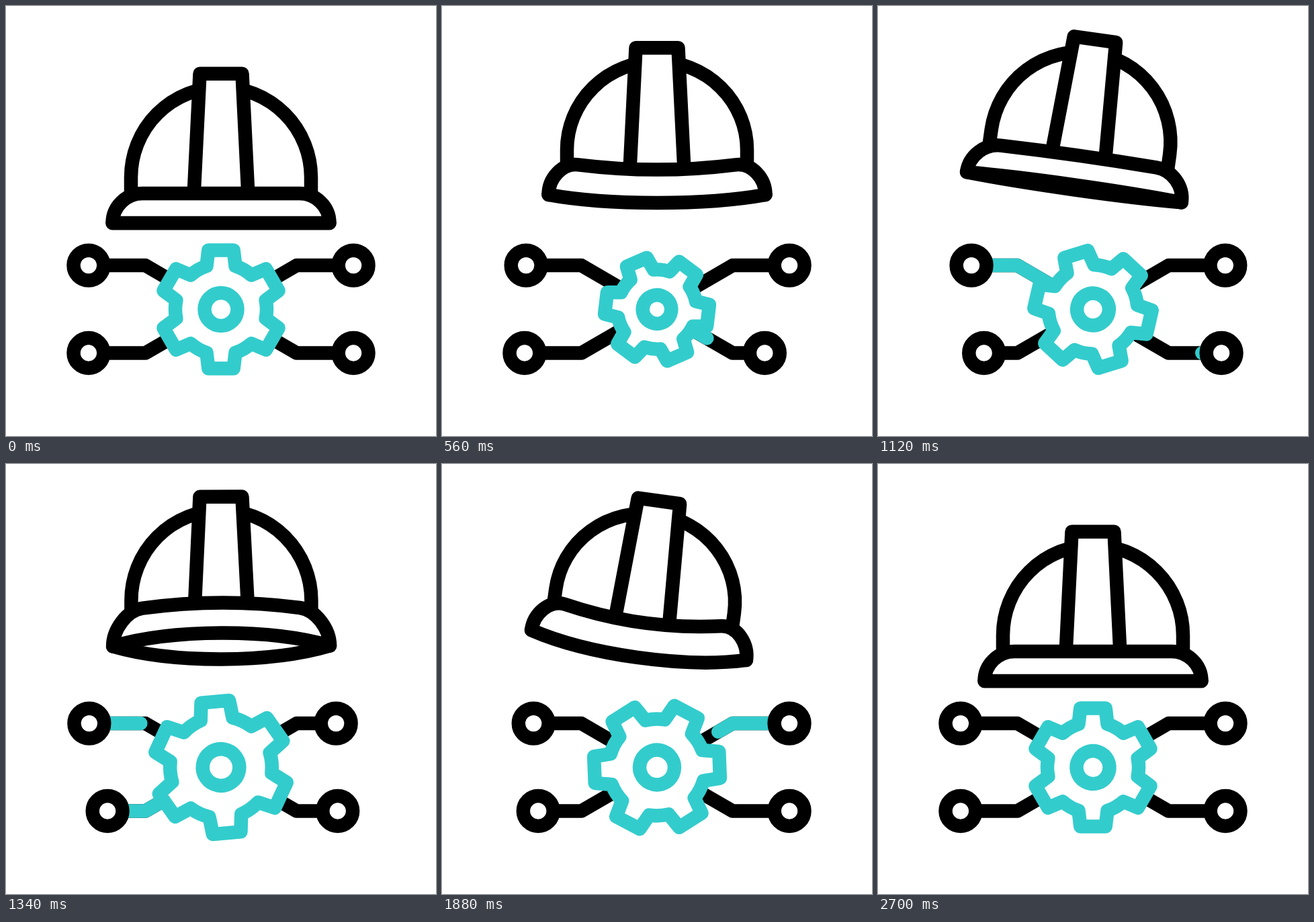
An HTML page with a canvas that plays this animation: 640x640 px, repeating every 3 s.

```html
<!DOCTYPE html>
<html lang="en">
<head>
<meta charset="utf-8">
<title>Engineering helmet</title>
<style>
  html, body { margin: 0; width: 100%; height: 100%; overflow: hidden; background: #fff; }
  canvas { display: block; width: 640px; height: 640px; }
</style>
</head>
<body>
<canvas id="stage" width="640" height="640"></canvas>
<script>
const ctx = document.getElementById('stage').getContext('2d');
const LOOP = 3000, STEP = 20, START = 200, STAGGER = 300;
const BLACK = '#000', TEAL = '#33cccc', WHITE = '#fff';
const WEIGHT = 20.5;
const CX = 320, CY = 451.5;
const DEG = Math.PI / 180;

// Sine ease from 0 to 1 between two times.
function ease(t, from, to) {
  const p = Math.min(1, Math.max(0, (t - from) / (to - from)));
  return (1 - Math.cos(Math.PI * p)) / 2;
}

// Rise to 1, hold, fall back to 0.
const pulse = (t, a, b, c, d) => ease(t, a, b) - ease(t, c, d);

const landing = t => ease(t, 2060, 2710);

const lift = t => -46 * (ease(t, START, 690) - landing(t)) - 6 * pulse(t, 860, 1200, 1500, 1880);

const tilt = t => 8.2 * (pulse(t, 560, 1100, 1100, 1320)
  - pulse(t, 1320, 1540, 1540, 1720) + pulse(t, 1720, 1900, 1900, 2280));

const bend = t => 18.5 * (ease(t, START, 800) - landing(t)) - 38 * pulse(t, 850, 1340, 1340, 1800);

const gearScale = t => 1 - 0.19 * pulse(t, START, 780, 780, 1460) + 0.14 * pulse(t, 780, 1460, 1460, 2220);

const gearTurn = t => -55 * ease(t, START, 1000) - 145 * ease(t, 880, 1820) - 40 * ease(t, 1390, 2700);

const nodeShift = t => 37 * pulse(t, 0, 380, 420, 790) + 24 * pulse(t, 790, 1180, 1180, 1610);

// Corners in the order in which they start moving.
const NODES = [[1, 1], [-1, -1], [-1, 1], [1, -1]];

function paint(stroke, fill) {
  if (fill) { ctx.fillStyle = fill; ctx.fill(); }
  ctx.strokeStyle = stroke;
  ctx.stroke();
}

function ring(x, y, r, color) {
  ctx.beginPath();
  ctx.arc(x, y, r, 0, Math.PI * 2);
  paint(color, WHITE);
}

function polyline(...points) {
  ctx.beginPath();
  points.forEach(p => ctx.lineTo(...p));
}

function drawNode([sx, sy], phase) {
  const bendX = CX + sx * 112.5, y = CY - 0.2 + sy * 65.2;
  const x = CX + sx * (197.1 - nodeShift(phase));
  polyline([CX, CY], [bendX, y], [x, y]);
  paint(BLACK);

  // signal travelling from the gear to the node
  const total = Math.hypot(112.5, 65.2) + Math.abs(x - bendX);
  const reach = 0.53 * (phase - 198);
  const head = Math.min(total, reach), tail = Math.max(0, reach - 203);
  if (head > tail) {
    ctx.setLineDash([0, tail, head - tail, 1000]);
    paint(TEAL);
    ctx.setLineDash([]);
  }
  ring(x, y, 22.4, BLACK);
}

function drawGear(t) {
  const s = gearScale(t);
  const base = Math.atan2(21.5, 64.5), valley = 68 * s;
  const tip = Math.atan2(18.7, 88), tipRadius = Math.hypot(18.7, 88) * s;
  ctx.save();
  ctx.translate(CX, CY);
  ctx.rotate(gearTurn(t) * DEG);
  ctx.beginPath();
  for (let i = 0; i < 6; i++) {
    const a = i * 60 * DEG - Math.PI / 2;
    for (const corner of [a - tip, a + tip]) {
      ctx.lineTo(tipRadius * Math.cos(corner), tipRadius * Math.sin(corner));
    }
    ctx.arc(0, 0, valley, a + base, a + 60 * DEG - base);
  }
  ctx.closePath();
  paint(TEAL, WHITE);
  ring(0, 0, 24.5 * s, TEAL);
  ctx.restore();
}

function drawHelmet(t) {
  const half = 161.5, inner = 117;
  const b = bend(t), down = Math.max(b, 0), up = Math.max(-b, 0);
  const rim = 201 - 0.3 * down;
  const shoulder = rim - 44 - 0.05 * down - 0.65 * up;
  const middle = rim - 44 + 0.55 * down - 1.05 * up;
  const control = 2 * middle - shoulder;
  const outer = inner + 24, knee = shoulder - (control - shoulder) / inner * 24;
  const rimCurve = (from, sag) => {
    const y = rim + sag * 4 / 3;
    ctx.bezierCurveTo(from * 0.45, y, -from * 0.45, y, -from, rim);
  };

  ctx.save();
  ctx.translate(CX, 122 + lift(t));
  ctx.rotate(tilt(t) * DEG);

  // far side of the rim
  ctx.beginPath();
  ctx.moveTo(-half, rim);
  rimCurve(-half, -b);
  paint(BLACK, WHITE);

  // dome
  const squeeze = 0.2 * down;
  ctx.beginPath();
  ctx.moveTo(-134, 157);
  ctx.ellipse(0, 133 - squeeze, 134, 134 - squeeze, 0, Math.PI, 0);
  ctx.lineTo(134, 157);
  paint(BLACK, WHITE);

  // ridge
  polyline([-40.3, 157], [-31.5, -21.3], [31.5, -21.3], [40.3, 157]);
  paint(BLACK, WHITE);

  // brim
  ctx.beginPath();
  ctx.moveTo(-half, rim);
  ctx.bezierCurveTo(-half, rim - 24.5, -outer, knee, -inner, shoulder);
  ctx.quadraticCurveTo(0, control, inner, shoulder);
  ctx.bezierCurveTo(outer, knee, half, rim - 24.5, half, rim);
  rimCurve(half, b);
  ctx.closePath();
  paint(BLACK, WHITE);
  ctx.restore();
}

function frame(now) {
  const t = Math.floor((now % LOOP) / STEP) * STEP;
  ctx.fillStyle = WHITE;
  ctx.fillRect(0, 0, 640, 640);
  ctx.lineWidth = WEIGHT;
  ctx.lineCap = ctx.lineJoin = 'round';
  NODES.forEach((corner, i) => drawNode(corner, t - START - i * STAGGER));
  drawGear(t);
  drawHelmet(t);
}

const begin = performance.now();
function tick() {
  frame(performance.now() - begin);
  requestAnimationFrame(tick);
}
tick();
</script>
</body>
</html>
```
